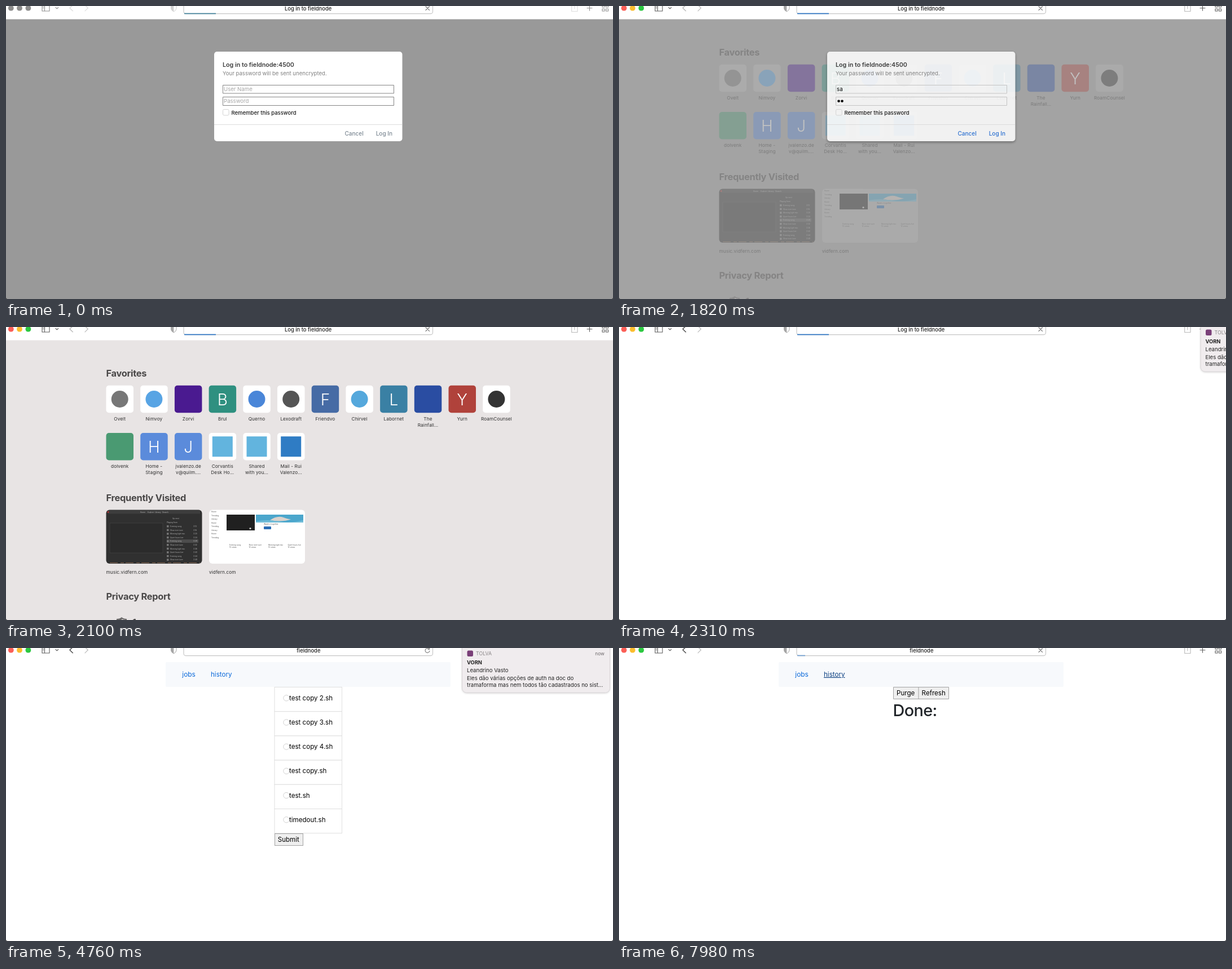
Animation, 1076 px wide and 520 px high, one loop 8000 ms. Source, as an HTML page:

```html
<!DOCTYPE html>
<html lang="en">
<head>
<meta charset="utf-8">
<title>Job runner login</title>
<style>
html, body { margin: 0; width: 100%; height: 100%; overflow: hidden; background: #fff; }
svg { display: block; width: 1076px; height: 520px; font-family: Inter, "Open Sans", sans-serif; }
.head { font-size: 16.4px; font-weight: 700; letter-spacing: -.27px; fill: #4a4848; }
.label { font-size: 8.2px; letter-spacing: .12px; fill: #2e2e2e; }
.tiny { font-size: 3.2px; }
.mid { text-anchor: middle; }
.line { fill: none; stroke-linecap: round; stroke-linejoin: round; }
.field { font-size: 9.6px; }
.hint { fill: #a6a6a6; }
.page { font-size: 11.6px; }
.note { font-size: 9.6px; fill: #222; }
.button { fill: #efefef; stroke: #a3a3a3; }

/* One shared 8 s clock, every change is a hard step. 1% = 80 ms */
.t { animation: 8s step-end -4ms infinite; }

#bg { animation-name: bg; }
@keyframes bg {
  0% { fill: #999 } 21.875% { fill: #9c9c9c } 22.75% { fill: #a3a3a3 } 23.625% { fill: #b8b6b6 }
  24.5% { fill: #cfcbcb } 26.25% { fill: #e8e4e4 } 27.125%, to { fill: #fff }
}
#start { animation-name: start; }
@keyframes start {
  0% { opacity: 0 } 21.875% { opacity: .12 } 22.75% { opacity: .34 } 23.625% { opacity: .62 }
  24.5% { opacity: 1 } 27.125%, to { opacity: 0 }
}
.white { fill: #fff; animation-name: white; }
@keyframes white { 0% { fill-opacity: .25 } 24.5% { fill-opacity: 0 } 26.25%, to { fill-opacity: 1 } }

#sheet { animation-name: sheet; }
@keyframes sheet {
  0% { fill: #fff; opacity: 1; filter: none }
  6.125% { fill: #fff; opacity: 1; filter: drop-shadow(0 2px 2px #0006) }
  21.875% { fill: #fff; opacity: .95; filter: drop-shadow(0 2px 2px #0006) }
  22.75% { fill: #fff; opacity: .85; filter: drop-shadow(0 2px 2px #0006) }
  23.625% { fill: #ebeaea; opacity: .7; filter: drop-shadow(0 2px 2px #0003) }
  24.5% { fill: #cfcbcb; opacity: .5; filter: none }
  26.25%, to { fill: #fff; opacity: 0; filter: none }
}
#sheetText { animation-name: sheetText; }
@keyframes sheetText { 0% { opacity: 1 } 23.625% { opacity: .7 } 24.5% { opacity: .35 } 26.25%, to { opacity: 0 } }
#boxes { fill: none; animation-name: boxes; }
@keyframes boxes {
  0% { stroke: #858585; opacity: 1 } 6.125% { stroke: #c4c4c4; opacity: 1 }
  23.625% { stroke: #c4c4c4; opacity: .4 } 24.5%, to { stroke: #c4c4c4; opacity: 0 }
}
#actions { animation-name: actions; }
@keyframes actions { 0% { fill: #7b8792 } 6.125% { fill: #2a6fd0 } 24.5%, to { fill: #a9b9bd } }

#userHint { animation-name: userHint; }
@keyframes userHint { 0% { opacity: 1 } 14%, to { opacity: 0 } }
#key1 { animation-name: key1; }
@keyframes key1 { 0% { opacity: 0 } 14%, to { opacity: 1 } }
#key2 { animation-name: key2; }
@keyframes key2 { 0% { opacity: 0 } 15.75%, to { opacity: 1 } }
#passHint { animation-name: passHint; }
@keyframes passHint { 0% { opacity: 1 } 17.5%, to { opacity: 0 } }
#key3 { animation-name: key3; }
@keyframes key3 { 0% { opacity: 0 } 17.5%, to { opacity: 1 } }
#key4 { animation-name: key4; }
@keyframes key4 { 0% { opacity: 0 } 19.25%, to { opacity: 1 } }

#red { animation-name: red; }
@keyframes red { 0% { fill: #8c8c8c } 6.125%, to { fill: #fb5f57 } }
#yellow { animation-name: yellow; }
@keyframes yellow { 0% { fill: #8c8c8c } 6.125% { fill: #fbbd2e } 24.5% { fill: #bdbbbb } 26.25%, to { fill: #fbbd2e } }
#green { animation-name: green; }
@keyframes green { 0% { fill: #8c8c8c } 6.125%, to { fill: #2bc840 } }
.icon { animation-name: icon; }
@keyframes icon { 0% { stroke: #8f8f8f } 6.125%, to { stroke: #5c5c5c } }
.faint { animation-name: faint; }
@keyframes faint { 0% { stroke: #dedede } 6.125%, to { stroke: #b9b9b9 } }
#back { animation-name: back; }
@keyframes back { 0% { stroke: #dedede } 6.125% { stroke: #b9b9b9 } 27.125%, to { stroke: #484848 } }
#shield { animation-name: shield; }
@keyframes shield { 0% { opacity: .5 } 6.125%, to { opacity: 1 } }

#login { animation-name: login; }
@keyframes login { 0% { opacity: 1 } 39.375%, to { opacity: 0 } }
#host { animation-name: host; }
@keyframes host { 0% { opacity: 0 } 39.375%, to { opacity: 1 } }
#stop { animation-name: stop; }
@keyframes stop { 0% { opacity: 1 } 39.375% { opacity: 0 } 75.25% { opacity: 1 } 80.5% { opacity: 0 } 99.75%, to { opacity: 1 } }
#reload { animation-name: reload; }
@keyframes reload { 0% { opacity: 0 } 39.375% { opacity: 1 } 75.25% { opacity: 0 } 80.5% { opacity: 1 } 99.75%, to { opacity: 0 } }
#bar { animation-name: bar; }
@keyframes bar {
  0% { width: 56px; fill: #3f7f98 } 6.125% { width: 56px; fill: #2a72c0 } 39.375% { width: 0; fill: #2a72c0 }
  75.25% { width: 14px; fill: #2a72c0 } 77% { width: 56px; fill: #2a72c0 } 80.5% { width: 0; fill: #2a72c0 }
  99.75%, to { width: 14px; fill: #6f9ccc }
}

#nav { animation-name: host; }
#jobs { animation-name: jobs; }
@keyframes jobs { 0% { opacity: 0 } 39.375% { opacity: 1 } 78.75%, to { opacity: 0 } }
#done { animation-name: done; }
@keyframes done { 0% { opacity: 0 } 78.75%, to { opacity: 1 } }
#pick { animation-name: pick; }
@keyframes pick { 0% { opacity: 0 } 60.375%, to { opacity: 1 } }
#submit { animation-name: submit; }
@keyframes submit { 0% { fill: #efefef } 73.5%, to { fill: #d9d9d9 } }
#history { animation-name: history; }
@keyframes history { 0% { fill: #0a69da; text-decoration: none } 93.625%, to { fill: #0b3f80; text-decoration: underline } }

#banner { animation-name: banner; }
@keyframes banner {
  0% { transform: translateX(280px) } 28.875% { transform: translateX(222.5px) } 29.75% { transform: translateX(150px) }
  30.625% { transform: translateX(84px) } 31.5% { transform: translateX(34px) } 32.375% { transform: translateX(8px) }
  33.25% { transform: none } 92.75% { transform: translateX(30px) } 93.625% { transform: translateX(115px) }
  94.5% { transform: translateX(205px) } 95.375%, to { transform: translateX(280px) }
}
</style>
</head>
<body>
<svg viewBox="0 0 1076 520">
  <rect id="bg" class="t" width="1076" height="520"/>

  <g id="start" class="t">
    <text class="head" x="177.5" y="88">Favorites</text>
    <g id="tiles"></g>
    <text class="head" x="177.5" y="308.5">Frequently Visited</text>
    <rect x="177.5" y="324.5" width="170" height="95.5" rx="6" fill="#303030"/>
    <path d="M181 328.5h163" stroke="#3d3d3d" stroke-width="6"/>
    <rect x="184" y="348" width="94" height="53" fill="#2b2b2b" stroke="#484848" stroke-width=".6"/>
    <path d="M285 380h56" stroke="#4c4c4c" stroke-width="6"/>
    <circle cx="181" cy="328.5" r="1.4" fill="#b33"/>
    <g id="songs" class="tiny" fill="#b5b5b5"></g>
    <path d="M184 418.5h160" stroke="#8a6a55" stroke-dasharray="14 5 6 3"/>
    <rect class="t white" x="360" y="324.5" width="170" height="95.5" rx="6"/>
    <g id="clips" class="tiny" fill="#555"></g>
    <rect x="391" y="333" width="50" height="28" fill="#202020"/>
    <circle cx="433" cy="357.5" r="1.6" fill="#ccc"/>
    <rect x="443" y="333" width="84" height="14" fill="#4ba6cc"/>
    <path d="M468 343q12-9 24-5t14 3q-16 6-38 2z" fill="#d9d2cd"/>
    <path d="M443 345q20-4 40 0t44-2v4h-84z" fill="#6fbcd8"/>
    <rect x="457" y="354" width="13" height="5" rx="1" fill="#2a6db5"/>
    <text class="label" x="177.5" y="437.5">music.vidfern.com</text>
    <text class="label" x="360" y="437.5">vidfern.com</text>
    <text class="head" x="177.5" y="484">Privacy Report</text>
    <path d="M196 518q6 0 9-3q3 3 9 3v4h-18z" fill="#6b6969"/>
    <path d="M205 518q3 1.5 7 2v2h-7z" fill="#c9c5c5"/>
    <text x="224" y="530" font-size="16" font-weight="700" fill="#4a4848">1</text>
  </g>

  <rect id="sheet" class="t" x="369" y="81" width="333.5" height="159" rx="5"/>
  <g id="boxes" class="t">
    <path d="M384.5 140.5h303v14.5h-303zM384.5 161.5h303v15h-303z"/>
    <rect x="384.5" y="183.5" width="10.5" height="10.5" rx="2" stroke="#d4d4d4"/>
    <path d="M369 210.5h333" stroke="#dcdcdc"/>
  </g>
  <g id="sheetText" class="t field">
    <text x="384" y="107.5" font-size="10.7" font-weight="600" fill="#3c3c3c">Log in to fieldnode:4500</text>
    <text x="384" y="122.7" fill="#808080">Your password will be sent unencrypted.</text>
    <text id="userHint" class="t hint" x="386" y="151">User Name</text>
    <text id="key1" class="t" x="386" y="151">s</text>
    <text id="key2" class="t" x="391.2" y="151">a</text>
    <text id="passHint" class="t hint" x="386" y="172">Password</text>
    <circle id="key3" class="t" cx="389.5" cy="168.8" r="2.3"/>
    <circle id="key4" class="t" cx="395.5" cy="168.8" r="2.3"/>
    <text x="399.5" y="192.5" font-size="9.5" font-weight="500" fill="#1c1c1c">Remember this password</text>
    <g id="actions" class="t" font-size="10" font-weight="500">
      <text x="600.5" y="229.7">Cancel</text>
      <text x="655.7" y="229.7">Log In</text>
    </g>
  </g>

  <g id="nav" class="t page">
    <rect x="283" y="25" width="505" height="44" rx="2" fill="#f7f9fc"/>
    <text x="312.3" y="50.8" font-size="11.9" fill="#0a69da">jobs</text>
    <text id="history" class="t" x="363" y="50.8">history</text>
  </g>
  <g id="jobs" class="t page">
    <g id="rows"></g>
    <g id="pick" class="t"><circle cx="497" cy="261.3" r="5.2" fill="#0b73f0"/><circle cx="497" cy="261.3" r="2" fill="#fff"/></g>
    <rect id="submit" class="t button" x="476.5" y="329.5" width="50" height="21"/>
    <text x="481.7" y="344.3">Submit</text>
  </g>
  <g id="done" class="t page">
    <path class="button" d="M486.5 69.5h98v21h-98zM531 69.5v21"/>
    <text x="492" y="84.2">Purge</text>
    <text x="536.6" y="84.2">Refresh</text>
    <text x="485.5" y="120.7" font-size="28.8" font-weight="500" letter-spacing="-.6" fill="#212529">Done:</text>
  </g>

  <rect width="1076" height="23.5" fill="#fff"/>
  <circle id="red" class="t" cx="8.8" cy="3.7" r="4.9"/>
  <circle id="yellow" class="t" cx="24" cy="3.7" r="4.9"/>
  <circle id="green" class="t" cx="39.4" cy="3.7" r="4.9"/>
  <g class="line" stroke-width="1.1">
    <path class="t icon" d="M64-3h13v12h-13zM68.5-3v12M65.8 1h1M65.8 3.5h1M88 2.5l2.3 2.3l2.3-2.3"/>
    <path id="back" class="t" d="M118.3-1.5l-5.3 5l5.3 5.3" stroke-width="1.4"/>
    <path class="t faint" d="M140-1.5l5.3 5l-5.3 5.3M1005-1h-2.3v10.5h10.3v-10.5h-2.3M1007.8-3v8"/>
    <path class="t icon" d="M1030 3.7h9M1034.5-1v9.2"/>
    <path class="t icon" d="M1057-2h4v4h-4zM1063.5-2h4v4h-4zM1057 5h4v4h-4zM1063.5 5h4v4h-4z"/>
    <rect x="315" y="-10" width="441.5" height="23.7" rx="4" stroke="#c6c6c6" stroke-width="1.2"/>
    <path id="stop" class="t" d="M744 .8l6.5 6.5M750.5 .8l-6.5 6.5" stroke="#666"/>
    <path id="reload" class="t" d="M750.3 2.3a3.9 3.9 0 1 0 .6 2.7M747.8 2.3h2.8v-3" stroke="#777"/>
  </g>
  <g id="shield" class="t">
    <path d="M292.5-4h9.5v8q0 3.5-4.7 6q-4.8-2.5-4.8-6z" fill="#fff" stroke="#a6a6a6"/>
    <path d="M297.3-4v14q-4.8-2.5-4.8-6v-8z" fill="#a6a6a6"/>
  </g>
  <rect id="bar" class="t" x="316" y="12.6" height="1.7"/>
  <g class="mid" font-size="9.4" font-weight="500" fill="#1e1e1e">
    <text id="login" class="t" x="535.6" y="8">Log in to fieldnode</text>
    <text id="host" class="t" x="536.3" y="8">fieldnode</text>
  </g>

  <g id="banner" class="t note">
    <rect x="808.5" y="-12" width="262" height="91.3" rx="8" fill="#f0ecee" stroke="#d8d4d6" style="filter:drop-shadow(0 1px 1.5px #0002)"/>
    <rect x="817.5" y="4.5" width="10.5" height="10.5" rx="2.5" fill="#7a3f78"/>
    <text x="833" y="13.2" font-size="8.8" fill="#8a8688">TOLVA</text>
    <text x="1044.3" y="13" font-size="8.3" fill="#6c686a">now</text>
    <text x="817" y="29.4" font-size="9.3" font-weight="700">VORN</text>
    <text x="817" y="43.3">Leandrino Vasto</text>
    <text x="817" y="56.8">Eles dão várias opções de auth na doc do</text>
    <text x="817" y="68.9">tramaforma mas nem todos tão cadastrados no sist...</text>
  </g>

  <path d="M0 517.5q.3 2 2.5 2.5h-2.5zM1076 517.5q-.3 2-2.5 2.5h2.5z" fill="#333"/>
</svg>
<script>
const fill = (id, html) => { document.getElementById(id).innerHTML = html; };
const text = (x, y, str, cls = "") => `<text x="${x}" y="${y}" class="${cls}">${str}</text>`;

// Tile: label lines, colour, then a letter, a "dot" or "box" on white, or nothing for a plain tile
const favorites = [[
  ["Ovelt", "#777", "dot"], ["Nimvoy", "#58a4e4", "dot"], ["Zorvi", "#4a1a90"], ["Brul", "#2f9080", "B"],
  ["Querno", "#4a86d8", "dot"], ["Lexodraft", "#555", "dot"], ["Friendvo", "#466ba5", "F"],
  ["Chirvel", "#55a8dc", "dot"], ["Labornet", "#3a80a4", "L"], ["The|Rainfall...", "#2a4da2"],
  ["Yurn", "#b0423b", "Y"], ["RoamCounsel", "#333", "dot"]
], [
  ["dolvenk", "#4a9a72"], ["Home -|Staging", "#5b8bdb", "H"], ["jvalenzo.de|v@quilm....", "#5b8bdb", "J"],
  ["Corvantis|Desk Ho...", "#62b4de", "box"], ["Shared|with you...", "#62b4de", "box"],
  ["Mail - Rui|Valenzo...", "#2f7cc4", "box"]
]];

function tile([label, color, mark], col, row) {
  const x = 177.5 + 60.7 * col, y = 103.8 + 84.2 * row, cx = x + 24.2, cy = y + 24.2;
  const onWhite = mark === "dot" || mark === "box";
  let out = `<rect x="${x}" y="${y}" width="48.5" height="48.5" rx="5" ${onWhite ? 'class="t white"' : `fill="${color}"`}/>`;
  if (mark === "dot") out += `<circle cx="${cx}" cy="${cy}" r="15" fill="${color}"/>`;
  else if (mark === "box") out += `<rect x="${cx - 18}" y="${cy - 18}" width="36" height="36" fill="${color}"/>`;
  else if (mark) out += `<text class="mid" x="${cx}" y="${cy + 10.5}" font-size="28" font-weight="300" fill="#fff">${mark}</text>`;
  return out + label.split("|").map((s, i) => text(cx, y + 62.2 + 10.5 * i, s, "label mid")).join("");
}
fill("tiles", favorites.map((list, row) => list.map((f, col) => tile(f, col, row)).join("")).join(""));

const words = ["Evening song", "Slow river tune", "Morning light mix", "Quiet hours live"];
let songs = ["Home", "Explore", "Library", "Search"].map((s, i) => text(238 + 13 * i, 329.5, s)).join("");
songs += text(295, 341, "Up next") + text(285, 348, "Playing from");
for (let i = 0; i < 10; i++) {
  const y = 355 + 6.6 * i;
  songs += `<rect x="285" y="${y - 3}" width="3.5" height="3.5" fill="#777"/>`;
  songs += text(291, y, words[i % 4]) + text(332, y, "3:" + (12 + 4 * i));
}
fill("songs", songs);

let clips = "";
for (let i = 0; i < 8; i++) clips += text(364, 329 + 6.5 * i, ["Home", "Trending", "Library"][i % 3]);
for (let i = 0; i < 4; i++) clips += text(396 + 34.5 * i, 388, words[i]) + text(396 + 34.5 * i, 392, "12 views");
fill("clips", clips + text(457, 351, "Watch it together"));

const files = ["test copy 2", "test copy 3", "test copy 4", "test copy", "test", "timedout"];
fill("rows", files.map((name, i) => {
  const y = 69.5 + 43.2 * i;
  return `<rect x="476" y="${y}" width="119.5" height="43.2" fill="#fff" stroke="#dfdfdf"/>
    <circle cx="497" cy="${y + 19.3}" r="5.2" fill="#fff" stroke="#d2d2d2"/>` + text(502, y + 23.3, name + ".sh");
}).join(""));
</script>
</body>
</html>
```
